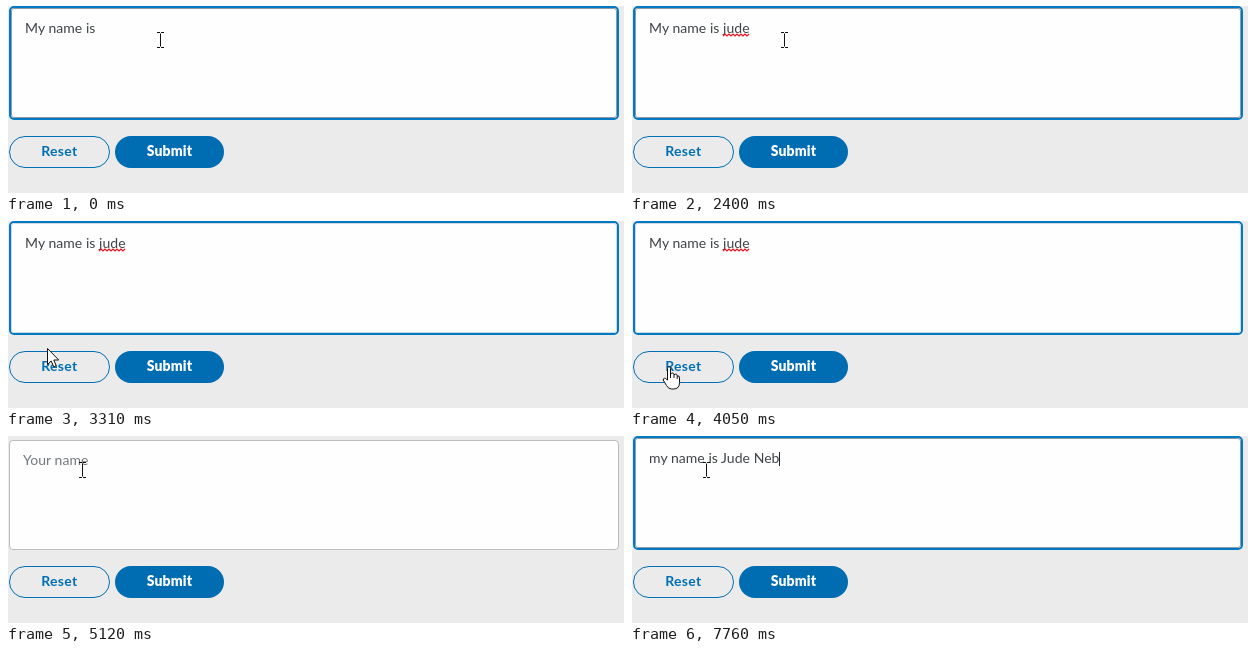
Animation of 618x187 px, one loop 8 s. Source, as an HTML page:

```html
<!DOCTYPE html>
<html lang="en">
<head>
<meta charset="utf-8">
<style>
  html, body { margin: 0; width: 100%; height: 100%; overflow: hidden; background: #ebebeb; }
  svg { display: block; font-family: Lato, "Open Sans", sans-serif; }
  #entry { font-size: 14px; letter-spacing: .04px; white-space: pre; }
  .label { font-size: 14px; font-weight: 700; letter-spacing: .28px; text-anchor: middle; }
  .strong { font-weight: 900; letter-spacing: .14px; }
</style>
</head>
<body>
<svg width="618" height="187" viewBox="0 0 618 187">
  <rect width="618" height="187" fill="#ebebeb"/>
  <rect width="2" height="187" fill="#fff"/>
  <rect id="plainBox" x="3.5" y="4.5" width="609" height="109" rx="3.5" fill="#fefefe"/>
  <g id="focusBox">
    <rect x="4" y="1" width="608" height="112" rx="4" fill="#fefefe" stroke="#0079c4" stroke-width="2"/>
    <rect id="innerLine" x="5.5" y="2.5" width="605" height="109" rx="2.5" fill="none"/>
  </g>
  <text id="entry"></text>
  <path id="squiggle" fill="none" stroke="#e8101a" stroke-width="1.2"/>
  <rect id="caret" y="16" width="1" height="14" fill="#222"/>
  <rect x="3.5" y="130.5" width="100" height="31" rx="15.5" fill="none" stroke="#006fb4"/>
  <text class="label" x="53.4" y="150" fill="#006fb4">Reset</text>
  <rect x="109" y="130" width="109" height="32" rx="16" fill="#006cb1"/>
  <text class="label strong" x="163.5" y="150" fill="#fff">Submit</text>
  <path id="beam" d="M.5-6.5V6.5M-3-7.5H0M1-7.5H4M-3 7.5H0M1 7.5H4" fill="none" stroke="#111"/>
  <path id="arrow" d="M.5.5V16.5L4.2 13L6.7 18.8L9.2 17.7L6.8 12H11.7Z" fill="#fff" stroke="#111"/>
  <g id="hand" fill="#fff" stroke="#111" stroke-linejoin="round">
    <path d="M-2.5 13V1.5Q-2.5-.5-1-.5T.5 1.5V7Q3.5 4.8 4 7.8Q7 6 7.2 9Q9.5 8 9.5 11V15.5Q9.5 22 3.5 22H1.5Q-1.5 22-3.5 18.5L-6.8 13Q-6.5 9.5-2.5 13Z"/>
    <path d="M.5 6V11M4 7.8V11M7.2 9V12" fill="none"/>
  </g>
</svg>
<script>
const LOOP = 8000, BLINK = 536;
const BLUR = 4190, CLEAR = 4310, FOCUS = 5330, PASTE = 7760;
const NAME = { text: 'jude', keys: [310, 430, 680, 1330] };
const RETYPE = { text: 'my ', keys: [6550, 6690, 7040] };
const START = [154, 34], BUTTON = [40, 146], FIELD = [76, 34];

const $ = id => document.getElementById(id);
const show = (id, on) => $(id).setAttribute('visibility', on ? 'visible' : 'hidden');
const set = (id, attrs) => {
  for (const name in attrs) $(id).setAttribute(name, attrs[name]);
};

const typed = ({ text, keys }, t) => text.slice(0, keys.filter(k => k <= t).length);

function textAt(t) {
  if (t < CLEAR) return 'My name is ' + typed(NAME, t);
  return typed(RETYPE, t) + (t >= PASTE ? 'name is Jude Neb' : '');
}

// The caret restarts its blink at every edit.
function caretOn(t) {
  const edits = [-BLINK, ...NAME.keys, FOCUS, ...RETYPE.keys, PASTE];
  const since = t - Math.max(...edits.filter(e => e <= t));
  return Math.floor(since / BLINK) % 2 === 0 && t >= NAME.keys[0];
}

// Each axis eases out with its own power, which bends the path.
function glide(t, start, end, from, to, powers) {
  const p = Math.min(1, Math.max(0, (t - start) / (end - start)));
  return from.map((a, i) => Math.round(a + (to[i] - a) * (1 - (1 - p) ** powers[i])));
}

const pointerAt = t => t < BLUR
  ? glide(t, 2650, 3480, START, BUTTON, [3, 1.12])
  : glide(t, 4740, 5120, BUTTON, FIELD, [2.4, 1.48]);

function wave(x0, x1) {
  let d = `M${x0} 30`;
  for (let x = x0 + 2, up = true; x <= x1; x += 2, up = !up) d += `L${x} ${up ? 28 : 30}`;
  return d;
}

function render(t) {
  const text = textAt(t);
  const focused = t < BLUR || t >= FOCUS;
  const [x, y] = pointerAt(t);
  const hovered = y < 114;

  show('focusBox', focused);
  show('plainBox', !focused);
  set('innerLine', { stroke: hovered ? '#8c9aa5' : '#cdd8e0' });
  set('plainBox', { stroke: hovered ? '#bcbcbc' : '#cdd1d5' });

  const left = focused ? 19 : 17, drop = focused ? 0 : 2;
  $('entry').textContent = text || 'Your name';
  set('entry', { x: left, y: 27 + drop, fill: text ? '#3f4347' : '#73787d' });

  const end = Math.round(left + (text ? $('entry').getComputedTextLength() : 0));
  show('caret', focused && caretOn(t));
  set('caret', { x: end });

  show('squiggle', t >= 2400 && t < CLEAR);
  set('squiggle', { d: wave(left + 74, end), transform: `translate(0 ${drop})` });

  const shape = hovered ? 'beam' : y >= 130 ? 'hand' : 'arrow';
  for (const id of ['beam', 'arrow', 'hand']) {
    show(id, id === shape);
    set(id, { transform: `translate(${x} ${y})` });
  }
}

function tick() {
  render(performance.now() % LOOP);
  requestAnimationFrame(tick);
}
tick();
</script>
</body>
</html>
```
